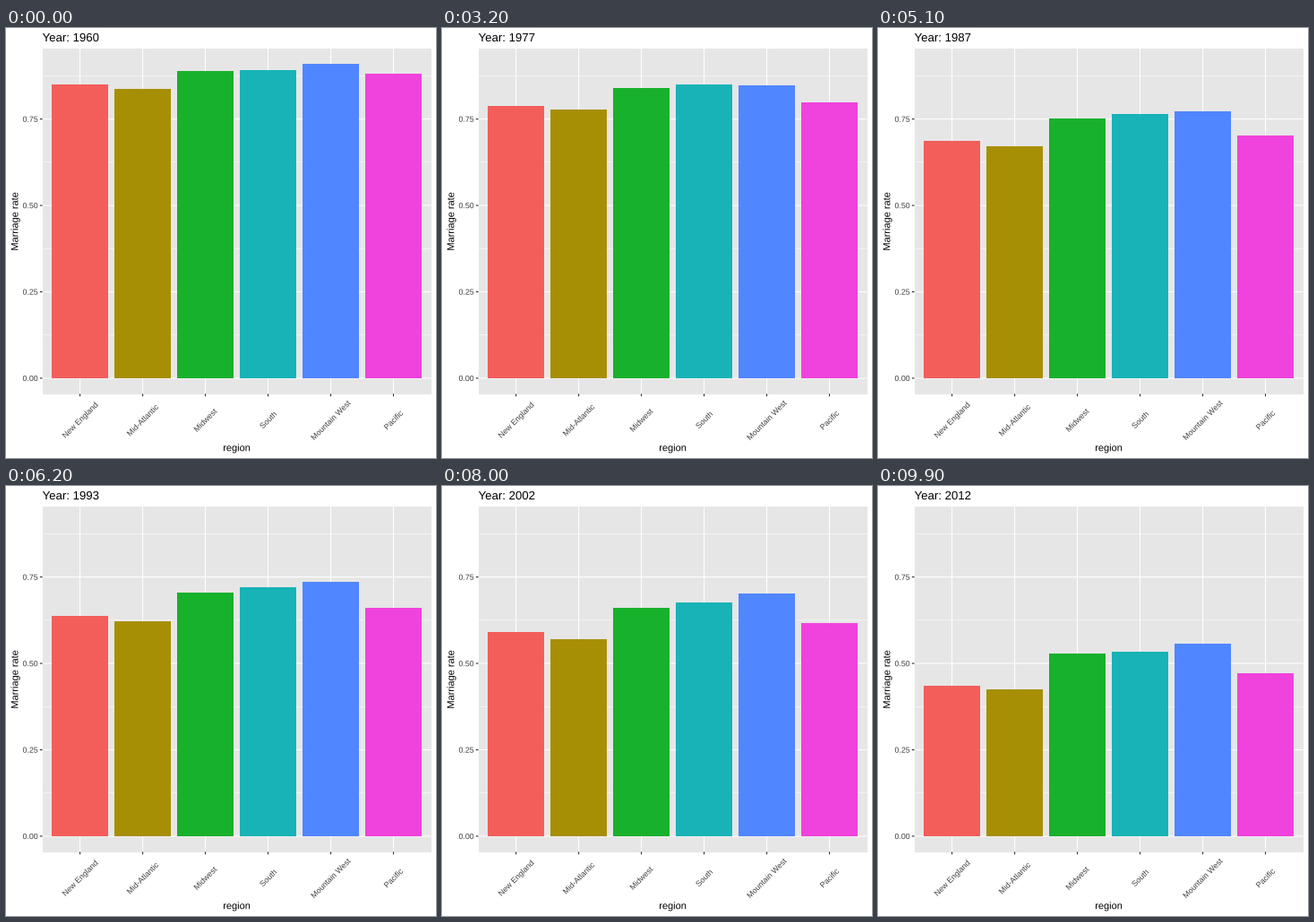
Write a matplotlib script that moves like this. It is 480 px wide and 480 px high and loops after 10000 ms.

```python
from math import ceil

import numpy as np
import matplotlib.pyplot as plt
from matplotlib.animation import FuncAnimation
from matplotlib.patches import PathPatch, Rectangle
from matplotlib.textpath import TextPath
from matplotlib.transforms import Affine2D

SIZE, DPI, FRAMES, INTERVAL = 480, 72, 100, 100
LEFT, RIGHT, TOP, BOTTOM = 40.6, 474.5, 22.94, 408.44
PITCH = (RIGHT - LEFT) / 6.2
BASE = BOTTOM - (BOTTOM - TOP) / 22
TICK, LABEL = "#282828", "#404040"

# Each region: colour and marriage rate in 1960, 1970, 1980, 2002 and 2012.
REGIONS = {
    "New England": ("#F35E5A", [.8496, .8483, .759, .591, .435]),
    "Mid-Atlantic": ("#A78F05", [.8371, .8357, .749, .570, .425]),
    "Midwest": ("#18B12C", [.8879, .8846, .817, .661, .528]),
    "South": ("#17B3B7", [.8909, .8874, .831, .676, .534]),
    "Mountain West": ("#5086FF", [.9085, .8971, .826, .702, .557]),
    "Pacific": ("#F042DC", [.8801, .8625, .767, .617, .472]),
}
SCALE = (BOTTOM - TOP) / 1.1 / REGIONS["Mountain West"][1][0]

plt.rcParams["font.family"] = "Liberation Sans"
fig = plt.figure(figsize=(SIZE / DPI, SIZE / DPI), dpi=DPI, facecolor="white")
ax = fig.add_axes([0, 0, 1, 1])
ax.set(xlim=(0, SIZE), ylim=(SIZE, 0))
ax.axis("off")


def rate_to_y(rate):
    return BASE - rate * SCALE


def pace(year):
    """Shared trend: position along the five rates at a given year."""
    return np.interp(year, [1960, 1980, 1990, 2000, 2002, 2007, 2012],
                     [0, 2, 2.63, 2.965, 3, 3.56, 4])


def add_rect(x0, y0, x1, y1, color, z):
    rect = Rectangle((x0, y0), x1 - x0, y1 - y0, facecolor=color, linewidth=0, zorder=z)
    return ax.add_patch(rect)


def add_line(x0, y0, x1, y1, color="white", width=1.07):
    ax.plot([x0, x1], [y0, y1], color=color, lw=width, zorder=1,
            solid_capstyle="butt", snap=False)


def text_path(x, y, text, size, align=.5, rotation=0):
    """Outline of a text; align is the share of its width left of x."""
    path = TextPath((0, 0), text, size=size)
    ends = path.get_extents()
    place = Affine2D().translate(-align * (ends.x0 + ends.x1), 0)
    return place.scale(1, -1).rotate_deg(-rotation).translate(x, y).transform_path(path)


def add_text(*args, color="black", **kwargs):
    patch = PathPatch(text_path(*args, **kwargs), facecolor=color, linewidth=0,
                      zorder=3, snap=False)
    return ax.add_patch(patch)


def title_path(year):
    return text_path(LEFT, 15, f"Year: {round(year)}", 13.2, align=0)


add_rect(ceil(LEFT), ceil(TOP), ceil(RIGHT), ceil(BOTTOM), "#E6E6E6", 0)

for rate in np.arange(.125, 1, .25):
    add_line(LEFT, rate_to_y(rate), RIGHT, rate_to_y(rate), width=.53)

for rate in np.arange(0, 1, .25):
    y = rate_to_y(rate)
    add_line(LEFT, y, RIGHT, y)
    add_line(LEFT - 2.75, y, LEFT, y, TICK)
    add_text(LEFT - 4.95, y + 3.15, f"{rate:.2f}", 8.8, align=1, color=LABEL)

bars = []
for i, (name, (color, rates)) in enumerate(REGIONS.items()):
    x = LEFT + (i + .6) * PITCH
    add_line(x, TOP, x, BOTTOM)
    add_line(x, BOTTOM, x, BOTTOM + 2.75, TICK)
    add_text(x + 2.2, 439.7, name, 8.8, rotation=45, color=LABEL)
    bar = add_rect(51 + 70 * i, rate_to_y(rates[0]), 114 + 70 * i, round(BASE), color, 2)
    bars.append((bar, rates))

add_text((LEFT + RIGHT) / 2, 472.2, "region", 11)
add_text(13.4, (TOP + BOTTOM) / 2, "Marriage rate", 11, rotation=90)
title = ax.add_patch(PathPatch(title_path(1960), facecolor="black", linewidth=0, snap=False))


def update(frame):
    year = 1960 + 52 * frame / (FRAMES - 1)
    title.set_path(title_path(year))
    for bar, rates in bars:
        # Bar tops move in whole pixels.
        y = round(rate_to_y(np.interp(pace(year), range(5), rates)))
        bar.set_y(y)
        bar.set_height(round(BASE) - y)
    return [title] + [bar for bar, _ in bars]


anim = FuncAnimation(fig, update, frames=FRAMES, interval=INTERVAL,
                     repeat=True, repeat_delay=0, blit=False)
plt.show()
```
